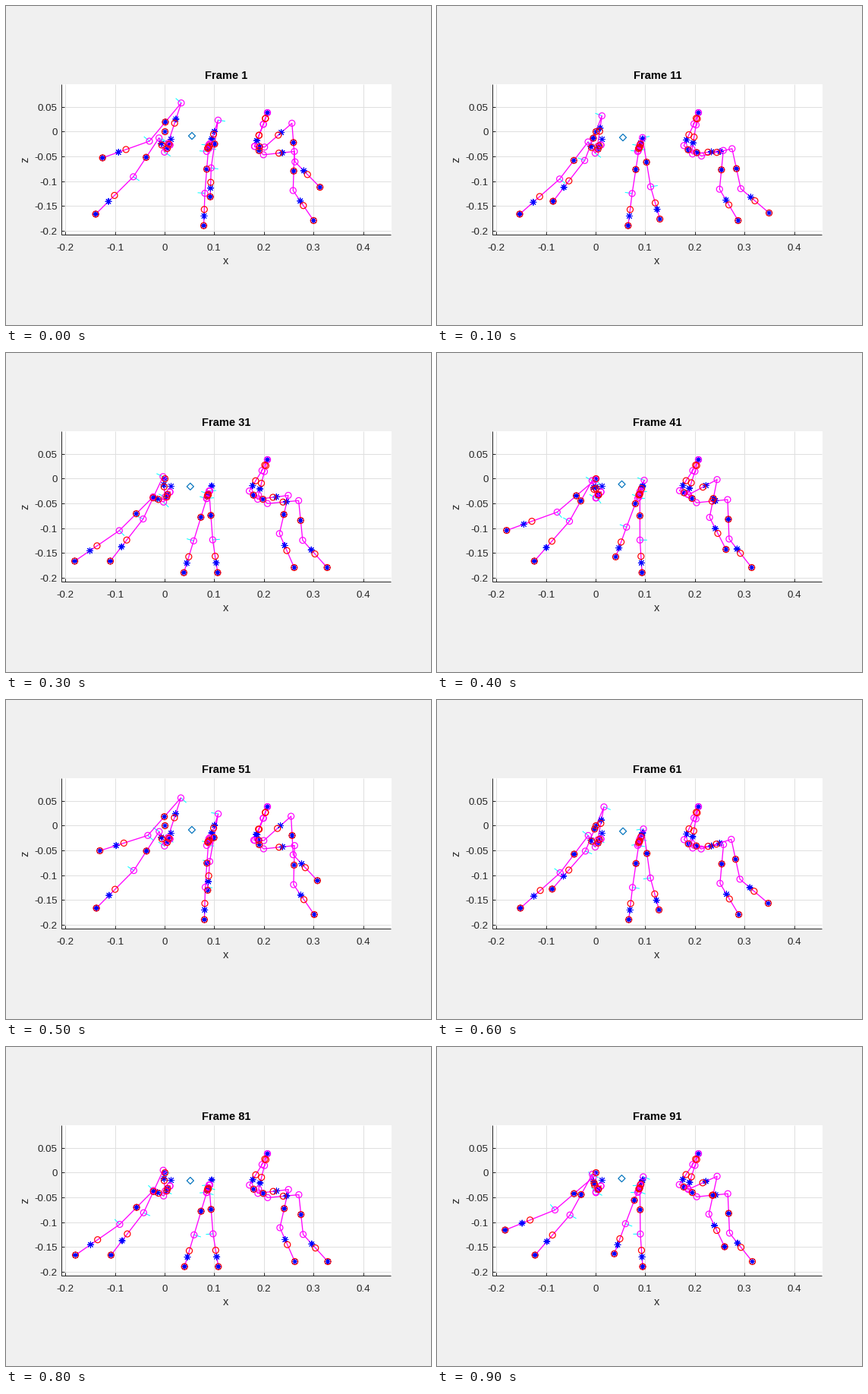
Write a matplotlib script that moves like this. It is 560 by 420 pixels and loops after 1000 ms.

```python
import numpy as np
import matplotlib.pyplot as plt
from matplotlib.animation import FuncAnimation

W, H = 560, 420
PX = 0.72                          # points per pixel at 100 dpi
STRIDE, STEP = 102, 10             # simulation steps per stride, per picture
TOUCH_DOWN, LIFT_OFF = 12, 86      # stride phases of foot contact
DARK = "#262626"

plt.rcParams["font.family"] = "Liberation Sans"


class Leg:
    """A chain of joints that shifts linearly with foot reach and foot lift."""

    def __init__(self, rest, reach, lift, star_at, axis_length):
        self.rest, self.reach, self.lift = map(np.array, (rest, reach, lift))
        self.star_at = np.array(star_at)[:, None]
        self.axis_length = axis_length

    def chain(self, phase):
        reach, lift = gait(phase)
        return self.rest + reach * self.reach + lift * self.lift


def gait(phase):
    """Foot reach (-1 back, 1 front) and lift (0..1)."""
    since = (phase - TOUCH_DOWN) % STRIDE
    stance = LIFT_OFF - TOUCH_DOWN
    if since < stance:
        return 1 - 2 * since / stance, 0
    t = (since - stance) / (STRIDE - stance)
    return 2 * t * t * (3 - 2 * t) - 1, np.sin(np.pi * t)


# Joints from the body outward, ending with knee, ankle and toe.
FRONT = Leg(
    rest=[(215.5, 182.5), (208.4, 191.6), (201.6, 172.2), (168.5, 223.7), (119.5, 273.5)],
    reach=[(0, 0), (1.5, -4.8), (9.4, -19.3), (22.8, -11.1), (34, 0)],
    lift=[(0, 0), (4.3, -10.5), (27.5, -42), (15.5, -45), (0, -76)],
    star_at=[0.5, 0.6, 0.5, 0.66], axis_length=-9)
MIDDLE = Leg(
    rest=[(268, 181), (264, 191), (266.6, 182.5), (262.5, 246), (261.8, 288.7)],
    reach=[(0, 0), (0.2, -0.3), (0.9, -2.5), (18.2, -1), (32.3, 0)],
    lift=[(0, 0), (3, -4), (12.5, -33), (3.5, -34), (0, -39)],
    star_at=[0.5, 0.6, 0.5, 0.7], axis_length=9)
HIND = Leg(
    rest=[(344, 140), (338.8, 155.1), (327.6, 184.5), (339.2, 195.6),
          (380, 191.3), (379, 242.8), (406.5, 282)],
    reach=[(0, 0), (2.3, 1), (8.7, 3.8), (9.3, 4.1), (9.9, 5), (22.2, 6.4), (31.5, 0)],
    lift=[(0, 0), (-0.7, 0), (-2.5, -1), (-1, -11.5), (-6, -39.5), (-3.5, -40.5), (0, -45)],
    star_at=[0, 0.74, 0.5, 0.61, 0.5, 0.35], axis_length=0)


def skeleton(step):
    """Joint axes, bones, joints, rings and stars at a simulation step."""
    gap = [(np.nan, np.nan)]
    axes, bones, joints = [], [], []
    rings = [(209, 165)]
    stars = [(209, 165), (217, 175), (270.5, 174.5)]
    for leg in (FRONT, MIDDLE, HIND):
        for side, offset in ((1, 0), (-1, STRIDE / 2)):
            chain = leg.chain(step + offset)
            start, span = chain[:-1], np.diff(chain, axis=0)
            bones += [*chain, *gap]
            joints += [*start]
            rings += [*(start + 0.5 * span), chain[-1]]
            stars += [*(start + leg.star_at * span), chain[-1]]

            shin = span[-2]
            normal = np.array([shin[1], -shin[0]]) / np.hypot(*shin)
            for joint in chain[-4:-1]:
                axes += [joint, joint + side * leg.axis_length * normal, *gap]
    return [np.array(points, float) for points in (axes, bones, joints, rings, stars)]


def body_center(step):
    angle = 4 * np.pi / STRIDE
    return (243.5 + 1.2 * np.cos(angle * (step - 5)),
            173.2 - 2.7 * np.cos(angle * (step + 1)))


def rule(xs, ys, color, zorder):
    ax.plot(xs, ys, color=color, lw=PX, solid_capstyle="butt",
            solid_joinstyle="miter", snap=False, zorder=zorder)


def label(x, y, text, size=14.67, **style):
    style = {"color": DARK, "ha": "center", "va": "baseline", **style}
    return ax.text(x, y, text, size=size * PX, **style)


def draw_axes():
    ax.add_patch(plt.Rectangle((72.5, 102.5), 434.5, 199, fc="white", lw=0, zorder=0))
    for k in range(-2, 5):
        x = round(209 + 65.4 * k)
        rule([x, x], [103, 301], "#dfdfdf", 1)
        rule([x, x], [297, 301], DARK, 2)
        label(x - 0.7, 316.6, f"{k / 10:g}", 13.33, va="center_baseline")
    for k in range(-4, 2):
        y = round(165.4 - 32.65 * k)
        rule([73, 507], [y, y], "#dfdfdf", 1)
        rule([73, 77], [y, y], DARK, 2)
        label(67, y + 0.4, f"{k / 20:g}", 13.33, ha="right", va="center_baseline")
    rule([73, 73, 507], [103, 301, 301], DARK, 2)
    label(289.5, 340, "x")
    label(25, 202, "z", rotation=90, va="center")


def markers(shape, color, zorder, size=8, width=1.2):
    dots = ax.scatter([], [], s=(size * PX) ** 2, marker=shape,
                      linewidths=width * PX, zorder=zorder)
    dots.set(facecolor="none", edgecolor=color, snap=False)
    return dots


fig = plt.figure(figsize=(W / 100, H / 100), dpi=100, facecolor="#f0f0f0")
ax = fig.add_axes([0, 0, 1, 1])
ax.axis("off")
draw_axes()
title = label(290, 96, "", weight="bold", color="black")
center = markers("D", "#0072bd", 3, 6.4)
axis_lines, = ax.plot([], [], color="cyan", lw=PX, zorder=3)
bone_lines, = ax.plot([], [], color="magenta", lw=1.3 * PX, zorder=4)
joint_dots = markers("o", "magenta", 6)
ring_dots = markers("o", "red", 7)
star_dots = markers((8, 2, 0), "blue", 5, width=1)
ax.set_xlim(-0.5, W - 0.5)
ax.set_ylim(H - 0.5, -0.5)


def update(i):
    step = STEP * i
    axes, bones, joints, rings, stars = skeleton(step)
    title.set_text(f"Frame {step + 1}")
    center.set_offsets([body_center(step)])
    axis_lines.set_data(*axes.T)
    bone_lines.set_data(*bones.T)
    joint_dots.set_offsets(joints)
    ring_dots.set_offsets(rings)
    star_dots.set_offsets(stars)


anim = FuncAnimation(fig, update, frames=10, interval=100, repeat=True)
plt.show()
```
